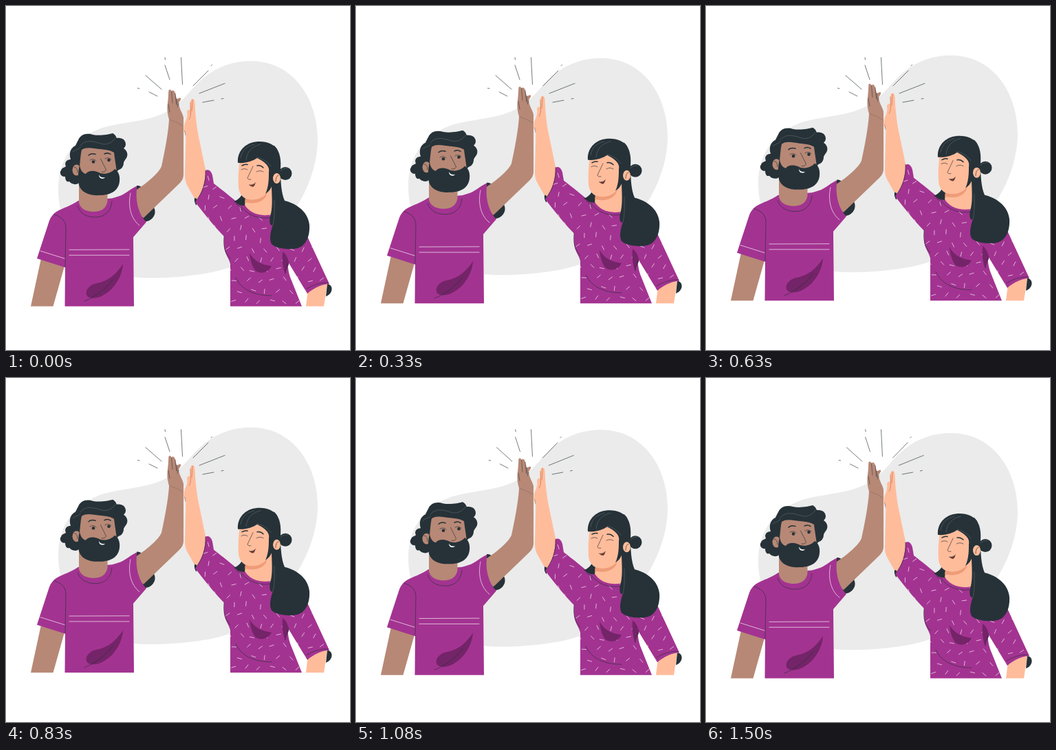
These frames come from a looping animation (500x500 px, 1540 ms). An HTML page:

```html
<!DOCTYPE html>
<html lang="en">
<head>
<meta charset="utf-8">
<title>High five</title>
<style>
html, body { margin: 0; width: 100%; height: 100%; overflow: hidden; background: #fff; }
svg { display: block; width: 100vw; height: 100vh; }
.ink { fill: #263238; }
.skin { fill: #b78876; }
.peach { fill: #ffbc9b; }
.shirt { fill: #a33391; }
.fold { fill: #742468; }
.line { fill: none; stroke: #263238; stroke-width: .65; stroke-linecap: round; stroke-linejoin: round; }
.bold { stroke-width: 1.5; }
.white { fill: none; stroke: #fff; stroke-width: .65; stroke-linecap: round; }
.shine { fill: none; stroke: #66747a; stroke-width: .5; stroke-linecap: round; }
</style>
</head>
<body>
<svg viewBox="0 0 500 500">
  <defs>
    <path id="top" d="M290 239C294 237 298 239 300 246L302 258C315 268 329 279 340 289L350 286L388 290L390 310L438 335L470 404C460 404 447 410 438 418L410 372C409 382 412 392 415 399L430 436.5H326V375C324 366 318 361 317 350L317 335C303 321 289 303 275 285C285 272 290 256 290 239Z"/>
    <clipPath id="topClip"><use href="#top"/></clipPath>
  </defs>

  <g id="scene">
    <path fill="#ebebeb" d="M357 80C420 81 453 138 453 193C453 262 405 340 322 381C290 392 225 398 184 394C120 386 76 330 76 266C76 220 102 190 140 177C168 169 200 168 223 158.500C256 146 266 121 289 103C308 88 330 80 357 80Z"/>

    <!-- man -->
    <path class="skin" d="M51 367L36 436.5H68.5L85 378Z"/>
    <path class="ink" d="M190 261C195 260 200 265 203 272L208 289C215 288 218 297 216 303C213 311 205 315 196 313L188 290Z"/>
    <path class="skin" d="M190 267C205 257 222 243 226 233C230 215 236 185 237 165C235 158 234 152 234.5 145C235.5 138 236 130 236.3 123C237 120.5 240 121 240.5 124C242 121.5 245 122.5 246 127L248 135C250 135.5 252 132.5 254 134C255 136.5 251.5 138.5 251 142C252 150 256.5 155 258 162L258 245C258 250 256 254 252 258L200 308L184 300Z"/>
    <path class="line" stroke-opacity=".8" d="M240.500 124L242 141M246 127L247.500 143M248 135L249 144M251 142L249 147M236 143L238 154"/>
    <path class="line" stroke-opacity=".3" d="M238 165Q248 168 257 174"/>
    <path class="shirt" d="M105 283C95 290 82 294 75 298C68 302 64 308 62 315L45 367L86 380L85.5 436.5H186L185 336L204 314C194 304 187 285 190.500 261.500C182 265 175 272 167 275.500C163 277 159 278 154 279.500Z"/>
    <path class="skin" d="M106 235V286C109 297 120 299 128 299C138 299 146 294 147.5 284V255Z"/>
    <path class="line" d="M104 291C108 303 119 307 130 307C143 307 153 299 154 284M70 303C80 306 87 312 87 322L86 379"/>
    <path class="white" d="M50 356L85 367M92 354.3L179 354M92 362.2H179M181 272C177 290 181 309 194 319"/>
    <path class="fold" d="M170 375C169 393 157 412 142 420C132 426 120 426 117 420C115 413 121 405 132 403C149 400 161 389 170 375Z"/>
    <path class="line" d="M114 429C128 424 146 411 155 398"/>

    <path class="ink" d="M105 195C108 187 117 184 126 187C136 189 148 187 155 185C159 187 160 190 161 192C169 191 174 195 174 201C174 204 172 206 171 207C176 210 178 216 175 221C173 224 171 226 171 228C171 233 168 237 164 238L150 250L106 257C102 261 95 259 92 255C88 257 86 252 86 248C80 249 77 242 80 239C81 235 85 235 87 233C84 227 89 223 94 223C91 214 94 206 101 203C102 201 103 198 105 195Z"/>
    <path class="skin" d="M110 209C117 204 127 207 136 208C145 209 151 209 157 213C158 222 160 232 161 243L150 255H112L106 240C108 228 108 217 110 209Z"/>
    <ellipse class="skin" cx="102.5" cy="238.5" rx="6" ry="8"/>
    <path class="line" d="M99 234Q104 234 104 242"/>
    <path class="ink" d="M107 231C108 238 111 243 116 244C120 238 131 239 137 243C144 245 153 243 158 237C164 240 166 248 165 255C164 266 155 275 137 275C121 276 109 271 106 260C104 250 105 240 107 231Z"/>
    <path fill="#fff" d="M135 245C136 248 139 250 144 249C142 252 135 252 135 245Z"/>
    <path class="line" d="M137.5 222L145.5 238Q144 242 139 241"/>
    <path class="line bold" d="M120 217Q124 213.500 130 215.500M143 215Q148 212.500 152 215.500"/>
    <path class="line" d="M122 224Q127 221 131 225M144 222Q149 219 153 223"/>
    <circle class="ink" cx="127" cy="226.5" r="2.3"/>
    <circle class="ink" cx="149.5" cy="224" r="2.3"/>
    <path class="shine" d="M108 203C116 193 128 197 138 200C147 203 155 198 159 192M97 212C103 207 107 209 108 205"/>

    <!-- woman -->
    <path class="peach" d="M271 135C273.5 135 274.5 138 274.5 141C275 156 277 175 280 190L290 238L296 265L277 285L264 262C261 257 260 252 260 245L261.5 187C258 183 258 177 260 170C263 164 264 159 263 154C263.5 150 267 150 267.5 152L268 140C268.5 136.5 269.5 135 271 135Z"/>
    <path fill="none" stroke="#d97e58" stroke-width=".9" d="M268 140L268.500 157Q268 162 266 165M271 136L270 153"/>
    <path class="line" stroke-opacity=".5" d="M259.500 181Q261 185 261 188"/>
    <path class="ink" d="M274 279L277 280V290Q273 286 274 279Z"/>
    <path class="peach" d="M440 404L436 436.5H462L468 398Z"/>
    <path class="ink" d="M467 404C476 405 476 418 465 422Z"/>
    <use href="#top" class="shirt"/>
    <g clip-path="url(#topClip)"><path id="dashes" class="white"/></g>
    <path class="fold" d="M354 359C361 371 371 376 386 378C381 388 370 390 363 385C358 380 355 370 354 359ZM402 357C408 361 411 369 411 376C408 381 406 385 406 390C402 380 401 368 402 357Z"/>
    <path class="line" d="M317 335C315 349 319 360 326 367M334 395C342 412 360 421 386 421M411 372Q407 379 406 389M437 411Q451 402 468 402M290 239C291 257 286 270 277 282M335 288Q341 291 343 297M342 291C350 304 369 311 387 307"/>

    <path class="ink" d="M346 267C343 276 338 282 331 284C336 287 339 290 344 290H352V267Z"/>
    <path class="peach" d="M350 270L347 289C353 300 369 307 387 303V258Z"/>
    <path fill="#ef9c78" d="M348 278C357 285 371 281 380 271C377 285 362 289 347 285Z"/>
    <circle class="ink" cx="406" cy="243.5" r="9.5"/>
    <path class="ink" d="M365 205L390 203C399 212 400 225 399 237C399 254 400 272 405 283C421 287 439 298 441 318C442 333 437 348 424 352C409 355 392 352 386 346C382 339 385 326 388 318C383 322 382 310 385 302C388 289 386 272 386 260Z"/>
    <path class="peach" d="M340 222C338 237 337 251 338 264C339 273 344 280 353 281C367 283 379 276 383 265L387 238L374 216Z"/>
    <path class="line bold" d="M343 232Q347 229.500 351 230.500M365 232Q370 231 374 235"/>
    <path class="ink" d="M337 228C336 213 345 203 356 199C372 194 388 199 394 208L399 237L388 246C389 256 387 267 377 273C382 263 382 250 382 242C384 233 377 227 365 221C359 225 349 229 337 228Z"/>
    <ellipse class="peach" cx="393.5" cy="250.5" rx="5.5" ry="7.5"/>
    <path class="line" d="M392 255Q392 247 396 246"/>
    <path class="shine" d="M341 221C343 209 350 204 361 201M349 224C350 211 358 204 370 201M365 220C375 222 381 228 385 233M399 240Q403 235 409 236"/>
    <path class="line" d="M342 238Q346 235 351 238M364 241Q369 238 374 241"/>
    <path class="line" d="M359 233L351 250Q352 253 356 252"/>
    <path fill="#70392f" d="M353.500 260Q359 261 362.500 257Q361 265 356 262Z"/>
    <path class="line" d="M353.500 260Q359 261 362.500 257"/>
    <path class="shine" d="M388 318C391 307 390 294 390 282"/>
  </g>
  <path id="rays" class="line" d="M231 75L231.500 78M231 86L238 107M254.500 75L256.500 114M272 116L294 94M298 87L299.500 85.500M281 127L318 112.500M286 140L302 137M313 135L316 134.500M203 101L226 121M191.500 119.500L194 120M208 125L220 131"/>
</svg>
<script>
const LOOP = 1540, STEP = 1000 / 24;
const scene = document.getElementById('scene');
const rays = document.getElementById('rays');

// Scattered strokes on the blouse: a jittered grid from a seeded generator.
function scatter() {
  let seed = 11, d = '';
  const rnd = () => (seed = (seed * 16807) % 2147483647) / 2147483647;
  for (let row = 0; row < 13; row++) {
    for (let col = 0; col < 12; col++) {
      const x = 276 + col * 18 + (row % 2) * 9 + rnd() * 5;
      const y = 246 + row * 15 + rnd() * 5;
      const a = rnd() * Math.PI;
      const dx = Math.cos(a) * 3.2, dy = Math.sin(a) * 3.2;
      d += `M${(x - dx).toFixed(1)} ${(y - dy).toFixed(1)}L${(x + dx).toFixed(1)} ${(y + dy).toFixed(1)}`;
    }
  }
  document.getElementById('dashes').setAttribute('d', d);
}

function draw(ms) {
  // Steps begin up to 10 ms early, as delays are whole hundredths.
  const t = Math.floor((ms % LOOP) / STEP + 0.12) * STEP;
  const y = 4.4 * (Math.cos((t + 45) / LOOP * 2 * Math.PI) - 0.98);
  scene.setAttribute('transform', `translate(0 ${y.toFixed(2)})`);
  const k = Math.min(1, Math.max(0, (t - 830) / 230));
  const s = 1 - 0.028 * k;
  rays.setAttribute('transform', `translate(255 0) scale(${s.toFixed(4)} 1) translate(-255 0)`);
}

scatter();
const start = performance.now();
function tick() {
  draw(performance.now() - start);
  requestAnimationFrame(tick);
}
draw(0);
requestAnimationFrame(tick);
</script>
</body>
</html>
```
